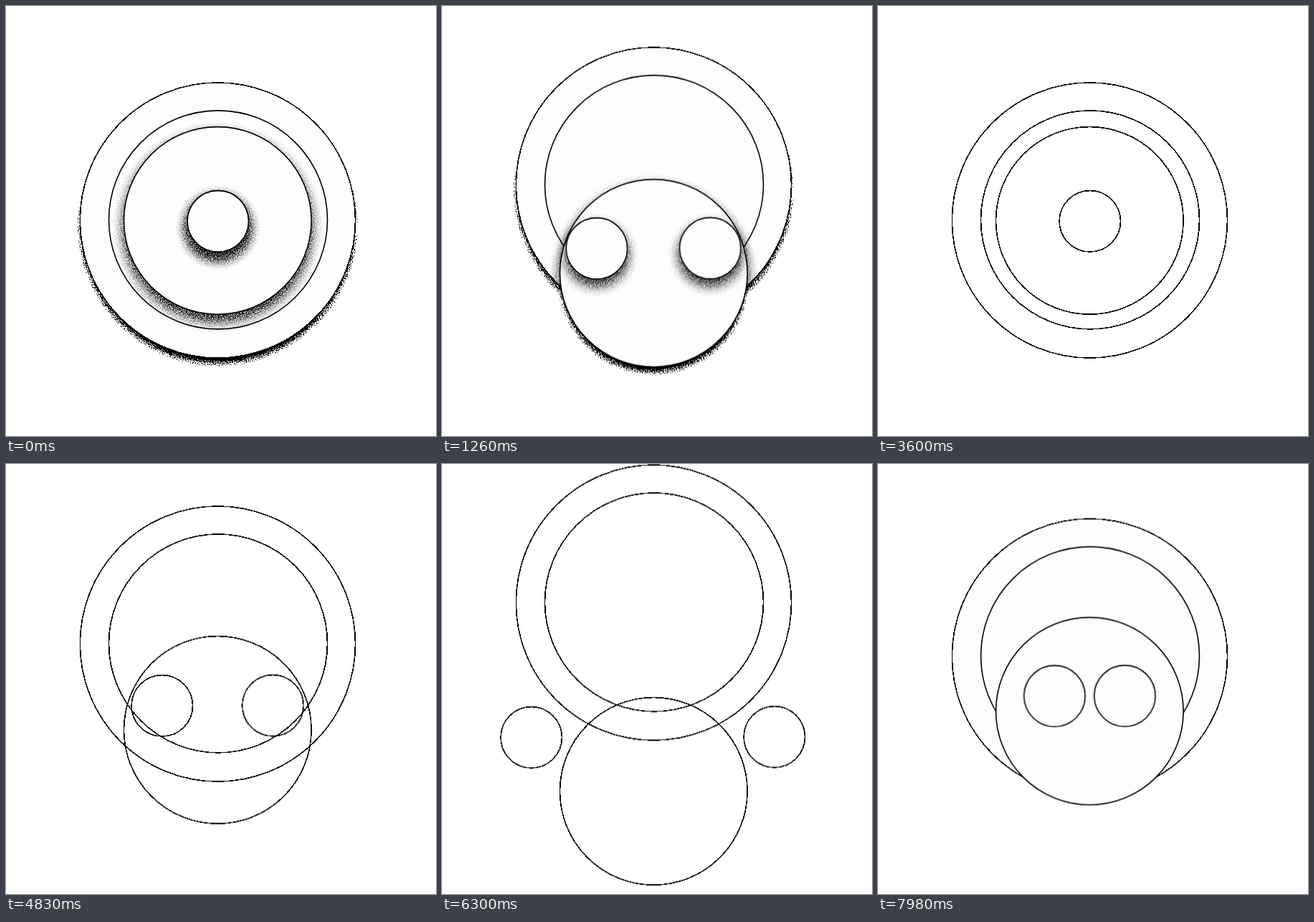
These frames come from a looping animation (600 px wide and 600 px high, 8000 ms). An HTML page without scripts:

```html
<!DOCTYPE html>
<html lang="en">
<head>
<meta charset="utf-8">
<title>Circles</title>
<style>
  html, body { margin: 0; width: 100%; height: 100%; overflow: hidden; background: #fff; }
  svg { display: block; width: 100vw; height: 100vh; }

  /* Scene start times; each scene hides again after 3.6s */
  .shaded { --d: -4ms; }
  .wire { --d: -4404ms; }
  .plain { --d: -804ms; }
  .shaded, .wire { animation: show 8s step-end var(--d) infinite; }
  @keyframes show { 0% { visibility: visible; } 45%, 100% { visibility: hidden; } }

  .m { animation: move 8s steps(90) var(--d) infinite; }
  @keyframes move {
    0% { transform: translate(0px, 0px); }
    33.75%, 100% { transform: translate(var(--x), var(--y)); }
  }

  /* Travel of each part */
  .o { --x: 0px; --y: -105.6px; }
  .h { --x: 0px; --y: 157.2px; }
  .l { --x: -171.2px; --y: 81.2px; }
  .r { --x: 168px; --y: 80.5px; }

  /* Travel relative to a moving parent */
  .oh { --x: 0px; --y: 262.8px; }
  .ol { --x: -171.2px; --y: 186.8px; }
  .or { --x: 168px; --y: 186.1px; }
  .hl { --x: -171.2px; --y: -76px; }
  .hr { --x: 168px; --y: -76.7px; }
  .lr { --x: 339.2px; --y: -.7px; }

  .body { fill: #fdfdfd; stroke: #000; stroke-width: 1.6; }
  .wire { fill: none; stroke: #000; stroke-width: 1.6; shape-rendering: crispEdges; }
  .crisp { shape-rendering: crispEdges; }
  .soft { filter: url(#soft); }
  .hard { filter: url(#hard); }
</style>
</head>
<body>
<svg viewBox="0 0 600 600">
  <defs>
    <circle id="outer" cx="295.4" cy="299" r="192.1"/>
    <circle id="inner" cx="296" cy="298.4" r="152.5"/>
    <circle id="head" cx="295.3" cy="299.4" r="130.8"/>
    <circle id="dot" cx="295.8" cy="300.3" r="42.7"/>
    <clipPath id="inOuter"><use href="#outer"/></clipPath>
    <clipPath id="inHead"><use href="#head"/></clipPath>
    <clipPath id="inDot"><use href="#dot"/></clipPath>

    <!-- Grainy grey shadow, used on top of other discs -->
    <filter id="soft" x="-40%" y="-40%" width="180%" height="180%" color-interpolation-filters="sRGB">
      <feOffset in="SourceAlpha" dy="8.5"/>
      <feGaussianBlur stdDeviation="9.5" result="shade"/>
      <feTurbulence type="fractalNoise" baseFrequency=".737" numOctaves="2" seed="4" x="240" y="240" width="110" height="110"/>
      <feColorMatrix values="0 0 0 0 0  0 0 0 0 0  0 0 0 0 0  0 0 0 3 -1"/>
      <feTile result="grain"/>
      <feComposite in="shade" in2="grain" operator="arithmetic" k1="1.6" k2=".25" k4="-.03"/>
    </filter>

    <!-- Pure black, dissolved shadow, used on the bare page -->
    <filter id="hard" x="-40%" y="-40%" width="180%" height="180%" color-interpolation-filters="sRGB">
      <feOffset in="SourceAlpha" dy="8"/>
      <feGaussianBlur stdDeviation="8" result="shade"/>
      <feTurbulence type="fractalNoise" baseFrequency=".737" numOctaves="2" seed="9" x="240" y="240" width="110" height="110"/>
      <feColorMatrix values="0 0 0 0 0  0 0 0 0 0  0 0 0 0 0  0 0 0 3 -1"/>
      <feTile result="grain"/>
      <feComposite in="shade" in2="grain" operator="arithmetic" k2="20" k3="8" k4="-14"/>
    </filter>
  </defs>

  <g class="plain body">
    <g class="m o">
      <use href="#outer" class="crisp"/>
      <use href="#inner"/>
    </g>
    <use href="#head" class="m h"/>
    <use href="#dot" class="m l"/>
    <use href="#dot" class="m r"/>
  </g>

  <g class="wire">
    <rect width="600" height="600" fill="#fff" stroke="none"/>
    <g class="m o">
      <use href="#outer"/>
      <use href="#inner"/>
    </g>
    <use href="#head" class="m h"/>
    <use href="#dot" class="m l"/>
    <use href="#dot" class="m r"/>
  </g>

  <g class="shaded">
    <rect width="600" height="600" fill="#fff"/>
    <use href="#outer" class="m o hard"/>
    <use href="#head" class="m h hard"/>
    <use href="#dot" class="m l hard"/>
    <use href="#dot" class="m r hard"/>

    <g class="m o">
      <use href="#outer" class="body crisp"/>
      <use href="#inner" class="body"/>
      <g clip-path="url(#inOuter)">
        <use href="#head" class="m oh soft"/>
        <use href="#dot" class="m ol soft"/>
        <use href="#dot" class="m or soft"/>
      </g>
    </g>

    <g class="m h">
      <use href="#head" class="body"/>
      <g clip-path="url(#inHead)">
        <use href="#dot" class="m hl soft"/>
        <use href="#dot" class="m hr soft"/>
      </g>
    </g>

    <g class="m l">
      <use href="#dot" class="body"/>
      <g clip-path="url(#inDot)">
        <use href="#dot" class="m lr soft"/>
      </g>
    </g>
    <use href="#dot" class="m r body"/>
  </g>
</svg>
</body>
</html>
```
